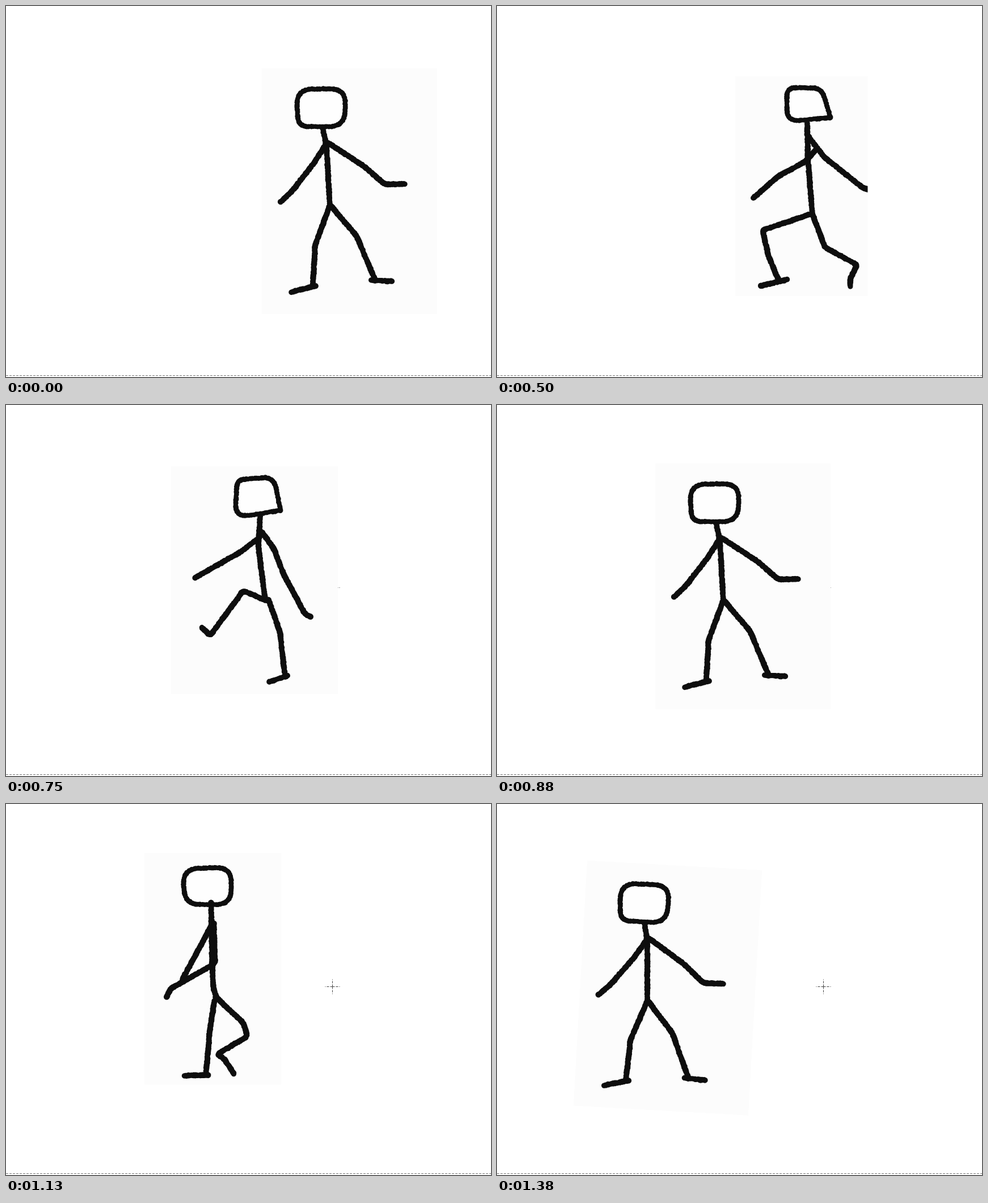
Animation of 855 by 655 pixels, one loop 1.87 s. Source, as an HTML page with a canvas:

```html
<!DOCTYPE html>
<html lang="en">
<head>
<meta charset="utf-8">
<title>Walking stick figure</title>
<style>
html, body { margin: 0; width: 100%; height: 100%; overflow: hidden; background: #fff; }
canvas { display: block; }
</style>
</head>
<body>
<canvas id="stage" width="855" height="655"></canvas>
<script>
const ctx = document.getElementById('stage').getContext('2d');
const LOOP = 1870, HOLD = 380, BEAT = 125;
const INK = '#0e0e0e', PAPER = '#fcfcfc', DASH = [4, 2];
const LIMB = 10, HEAD = 8.6, BEND = 6;

// Key points are "x,y" or "x,y,corner radius"; each line is one marker stroke.
const stand = {
  paper: [451, 110, 309, 434],
  head: '512,147,28 599,146,28 597,213,28 515,213,18',
  limbs: [
    '558,214 565,248 571,352',
    '564,244 543,277 506,325 484,346',
    '565,240 630,282 668,315 703,314',
    '571,352 545,422 541,491',
    '503,505 546,494',
    '572,352 618,406 650,482',
    '644,484 680,486'
  ]
};
const kick = {
  paper: [440, 112, 294, 402],
  head: '557,136,12 621,131,20 633,190,1 552,203,26',
  limbs: [
    '597,199 594,255 606,348',
    '596,238 560,265 482,309',
    '600,228 622,259 638,302 676,373 686,378',
    '608,349 567,332 509,411 494,397',
    '612,348 632,405 640,476',
    '613,493 645,482'
  ]
};
const lunge = {
  paper: [275, 117, 233.5, 388],
  head: '366,137,16 427,138,16 443,190,1 366,197,22',
  limbs: [
    '402,200 403,262 411,360',
    '403,222 432,260 500,314 512,318',
    '418,246 398,268 350,294 307,332',
    '409,360 323,389 334,436 351,476',
    '320,487 366,476',
    '411,360 433,419 490,450 477,476 478,488'
  ]
};
const pass = {
  paper: [388, 94, 242, 409],
  head: '456,122,28 542,119,28 541,185,26 460,185,26',
  limbs: [
    '506,182 508,290 510,332 516,350',
    '511,218 513,289 455,322 434,334 428,348',
    '505,225 455,318',
    '512,355 504,405 497,484',
    '459,487 501,486',
    '514,348 563,394 570,418 517,449 530,458 546,484'
  ]
};

// Pose, shift and turn in degrees for each beat.
const steps = [
  [stand, 0, 0, 0],
  [kick, 0, 0, 0],
  [lunge, 145, 7, 0],
  [pass, 0, 0, 0],
  [kick, -149, -4, 0],
  [stand, -172, -7, 0],
  [lunge, 0, 0, 0],
  [pass, -144.5, -7.5, 0],
  [kick, -298, -8, 0],
  [stand, -304.5, -2.3, 3.2]
];

// The first pose is held, then one beat per pose on a 10 ms grid.
const startOf = i => i ? Math.floor((HOLD + BEAT * (i - 1)) / 10) * 10 : 0;

let seed;
const random = () => (seed = (seed * 16807) % 2147483647) / 2147483647;
const uneven = amount => (random() - 0.5) * amount;
const mix = (a, b, t) => [a[0] + (b[0] - a[0]) * t, a[1] + (b[1] - a[1]) * t];
const distance = (a, b) => Math.hypot(b[0] - a[0], b[1] - a[1]);

// Polyline with its corners replaced by short quadratic curves.
function roundedPath(text, closed) {
  const pts = text.split(' ').map(p => p.split(',').map(Number));
  const n = pts.length, path = [];
  pts.forEach((p, i) => {
    if (!closed && (i === 0 || i === n - 1)) return path.push(p);
    const toward = q => mix(p, q, Math.min(0.5, (p[2] || BEND) / distance(p, q)));
    const a = toward(pts[(i + n - 1) % n]), b = toward(pts[(i + 1) % n]);
    for (let t = 0; t <= 1; t += 0.125) path.push(mix(mix(a, p, t), mix(p, b, t), t));
  });
  if (closed) path.push(path[0]);
  return path;
}

// Marker line: blots of slightly uneven size along the path.
function marker(path, width) {
  ctx.fillStyle = INK;
  ctx.beginPath();
  for (let i = 1; i < path.length; i++) {
    const n = Math.ceil(distance(path[i - 1], path[i]) / 1.8);
    for (let j = 0; j <= n; j++) {
      const [x, y] = mix(path[i - 1], path[i], j / n).map(v => v + uneven(0.9));
      const r = width / 2 + uneven(0.9);
      ctx.moveTo(x + r, y);
      ctx.arc(x, y, r, 0, 7);
    }
  }
  ctx.fill();
}

function dashed(x0, y0, x1, y1, color) {
  ctx.strokeStyle = color;
  ctx.setLineDash(DASH);
  ctx.beginPath();
  ctx.moveTo(x0, y0);
  ctx.lineTo(x1, y1);
  ctx.stroke();
}

function drawBackdrop() {
  ctx.fillStyle = '#fff';
  ctx.fillRect(0, 0, 855, 655);
  dashed(0, 652.5, 855, 652.5, '#777');
  const x = 575.5, y = 322.5;
  for (const arm of [-13, 13]) {
    dashed(x, y, x + arm, y, '#444');
    dashed(x, y, x, y + arm, '#444');
  }
}

function drawPose(pose, dx, dy, turn) {
  const [x, y, w, h] = pose.paper, cx = x + w / 2, cy = y + h / 2;
  seed = 4711;
  ctx.save();
  ctx.translate(cx + dx, cy + dy);
  ctx.rotate(turn * Math.PI / 180);
  ctx.translate(-cx, -cy);
  ctx.beginPath();
  ctx.rect(x, y, w, h);
  ctx.clip();
  ctx.fillStyle = PAPER;
  ctx.fillRect(x, y, w, h);

  const head = roundedPath(pose.head, true);
  ctx.fillStyle = '#fefefe';
  ctx.beginPath();
  head.forEach(p => ctx.lineTo(...p));
  ctx.fill();
  marker(head, HEAD);
  for (const limb of pose.limbs) marker(roundedPath(limb), LIMB);
  ctx.restore();
}

let shown;
const begin = performance.now();
function frame() {
  const t = Math.max(0, performance.now() - begin) % LOOP;
  const step = steps.filter((s, i) => startOf(i) <= t).pop();
  if (step !== shown) {
    shown = step;
    drawBackdrop();
    drawPose(...step);
  }
  requestAnimationFrame(frame);
}
frame();
</script>
</body>
</html>
```
